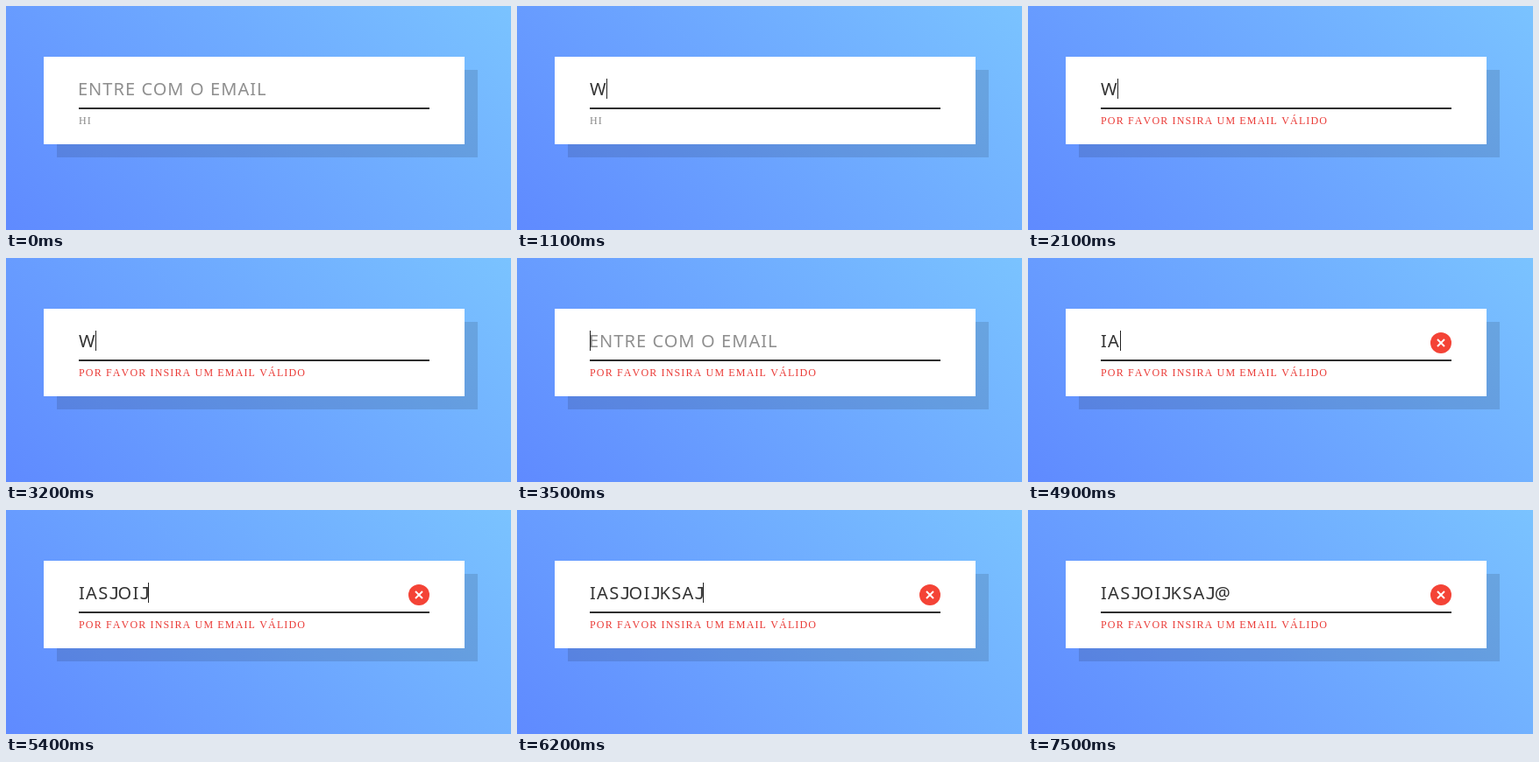
Write an HTML page that moves like this. It is 576 px wide and 256 px high and loops after 8000 ms.

```html
<!DOCTYPE html>
<html lang="pt">
<head>
<meta charset="utf-8">
<style>
  html, body { margin: 0; width: 100%; height: 100%; overflow: hidden; }
  svg {
    display: block;
    width: 576px;
    height: 256px;
    background: linear-gradient(45deg, #5f8aff, #7ac3ff);
  }
  .field { font: 20px "Noto Sans", sans-serif; }
  #hint { fill: #8f8f8f; letter-spacing: 1px; word-spacing: .3px; }
  #value { fill: #333; letter-spacing: 1.3px; }
  #value tspan { font-family: "DejaVu Sans Mono", monospace; letter-spacing: -2px; }
  #note { font: 12px "Liberation Serif", serif; letter-spacing: 1.15px; font-kerning: none; }
</style>
</head>
<body>
<svg viewBox="0 0 576 256">
  <rect x="58" y="73" width="480" height="100" fill="#000" opacity=".12"/>
  <rect x="43" y="58" width="480" height="100" fill="#fff"/>
  <text id="hint" class="field" x="82" y="102">ENTRE COM O EMAIL</text>
  <text id="value" class="field" x="83" y="102"></text>
  <rect id="caret" y="83" width="1" height="23" fill="#222"/>
  <rect x="83" y="116" width="400" height="2" fill="#2e2e2e"/>
  <text id="note" x="83" y="135"></text>
  <g id="icon">
    <circle cx="471" cy="97" r="12" fill="#f44336"/>
    <path d="M467 93l8 8m0-8l-8 8" stroke="#fff" stroke-width="2"/>
  </g>
</svg>
<script>
const LOOP = 8000, LEFT = 83;
const [hint, value, caret, note, icon] =
  ["hint", "value", "caret", "note", "icon"].map(id => document.getElementById(id));

// [start time, typed text]
const typing = [[0, ""], [1100, "W"], [3500, ""]];
const word = "IASJOIJKSAJ@";
[[4800, 1], [4900, 2], [5000, 4], [5200, 5], [5300, 6], [5400, 7],
 [5900, 8], [6000, 9], [6100, 10], [6200, 11], [7200, 12]]
  .forEach(([t, n]) => typing.push([t, word.slice(0, n)]));

// spans in which the caret is hidden
const blinks = [[0, 500], [1600, 2100], [2700, 3200], [4200, 4800], [6400, 6900], [7500, LOOP]];

const show = (el, on) => el.setAttribute("visibility", on ? "visible" : "hidden");

function draw(t) {
  const text = typing.findLast(([start]) => t >= start)[1];
  value.innerHTML = text.replace(/J/g, "<tspan>J</tspan>");
  show(hint, !text);

  const width = text ? value.getComputedTextLength() : 0;
  caret.setAttribute("x", LEFT + Math.floor(width));
  show(caret, !blinks.some(([from, to]) => t >= from && t < to));

  const invalid = t >= 1200;
  note.textContent = invalid ? "POR FAVOR INSIRA UM EMAIL VÁLIDO" : "HI";
  note.setAttribute("fill", invalid ? "#ea3a36" : "#8a8a8a");
  show(icon, t >= 3600);
}

const begin = performance.now();
function tick() {
  draw((performance.now() - begin) % LOOP);
  requestAnimationFrame(tick);
}
tick();
</script>
</body>
</html>
```
